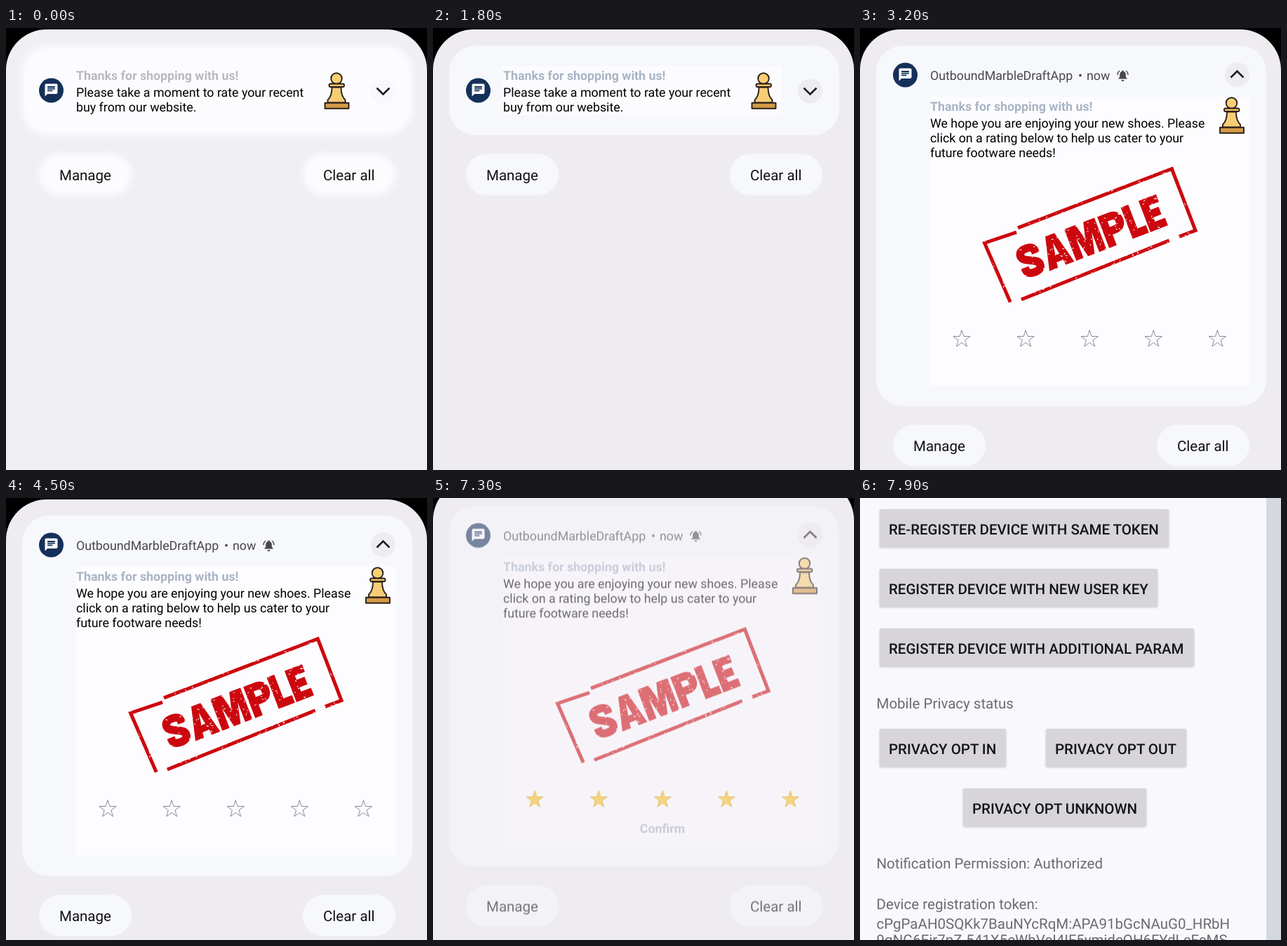
An HTML page for the animation above (8 s loop, 600 by 630 pixels).

```html
<!DOCTYPE html>
<html lang="en">
<head>
<meta charset="utf-8">
<style>
  html, body { margin: 0; width: 100%; height: 100%; overflow: hidden; }
  svg { display: block; width: 600px; height: 630px; }
  text { font: 17.8px Roboto, sans-serif; white-space: pre; text-rendering: geometricPrecision; }
  .title { font-weight: 700; fill: #a9b4c4; }
  .big { font-size: 20.5px; fill: #111113; }
  .label { font-size: 20.5px; fill: #6c6c70; }
  .button { font-size: 20.5px; font-weight: 500; fill: #151517; }
  .pad { fill: #d7d5d8; filter: drop-shadow(0 1.5px 1.5px #0003); }
  .line { fill: none; stroke: #1c1c1e; stroke-width: 2.6; }
</style>
</head>
<body>
<svg viewBox="0 0 600 630">
  <defs>
    <clipPath id="clip"><rect id="clipCard" x="23" y="25" width="556" rx="38"/></clipPath>
    <g id="pawn" stroke="#2b1f1d" stroke-width="1.900" stroke-linejoin="round">
      <path d="M464.500 84.500h13c0 9 1.500 14 6 18v4h-25v-4c4.500-4 6-9 6-18z" fill="#f6cd75"/>
      <circle cx="471" cy="72" r="7.800" fill="#f8cf72"/>
      <rect x="460.500" y="79.500" width="21.500" height="4.500" rx="2" fill="#f0c066"/>
      <rect x="454.500" y="106.800" width="34" height="8" fill="#d39a45"/>
    </g>
  </defs>

  <rect width="600" height="630" fill="#f9f8fb"/>
  <g id="app"></g>
  <rect id="strip" width="600" height="630" fill="#d4d9df"/>

  <g id="shade">
    <rect width="600" height="630" fill="#000"/>
    <rect id="panel" width="600" height="800" rx="58" fill="#efecf1"/>
    <g id="content">
      <g id="surfaces">
        <rect id="card" x="23" y="25" width="556" rx="38"/>
        <g class="actions">
          <rect x="47" y="26.500" width="132" height="59" rx="29.500"/>
          <rect x="423" y="26.500" width="132" height="59" rx="29.500"/>
        </g>
      </g>
      <g class="actions">
        <text class="big" x="76" y="63.500">Manage</text>
        <text class="big" x="452" y="63.500">Clear all</text>
      </g>

      <g id="compact">
        <rect x="99" y="54" width="398" height="70" fill="#fcfbfe"/>
        <text id="firstTitle" class="title" x="100" y="74">Thanks for shopping with us!</text>
        <text x="100" y="97.500">Please take a moment to rate your recent</text>
        <text x="100" y="119">buy from our website.</text>
        <use href="#pawn"/>
      </g>

      <g clip-path="url(#clip)">
        <g id="expanded">
          <rect x="100" y="98" width="455" height="412" fill="#fdfcff"/>
          <text class="title" x="100" y="118">Thanks for shopping with us!</text>
          <text x="100" y="142">We hope you are enjoying your new shoes. Please</text>
          <text x="100" y="163">click on a rating below to help us cater to your</text>
          <text x="100" y="184">future footware needs!</text>
          <use href="#pawn" x="58.500" y="35"/>
          <g transform="translate(327 294) rotate(-21)">
            <g fill="none" stroke="#cc080e" stroke-width="5">
              <path d="M-96-40L-144-42L-140 50M-92-45L143-45V49H118M103 49L-124 52"/>
              <g transform="translate(-109 -19.500)" stroke-width="11.500">
                <path d="M28 17V14Q28 6 17 6T6 14C6 24 28 24 28 34Q28 42 17 42T6 34V31"/>
                <path transform="translate(128)" d="M6 48V6H17Q28 6 28 16T17 26H6"/>
                <path transform="translate(164)" d="M6 0V42H25"/>
                <path transform="translate(191)" d="M27 6H6V42H27M6 24H24"/>
                <g fill="#cc080e" fill-rule="evenodd" stroke="none">
                  <path transform="translate(37)" d="M0 48L12 0H26L38 48H25L24 40H14L13 48ZM16 30H22L19 12Z"/>
                  <path transform="translate(78)" d="M0 48V0H17L23 24L29 0H46V48H35V18L28 48H18L11 18V48Z"/>
                </g>
              </g>
            </g>
            <path id="flecks" fill="none" stroke="#fdfcff"/>
          </g>
          <path id="stars"/>
          <text id="confirm" class="title" x="327" y="490.500" text-anchor="middle">Confirm</text>
        </g>
      </g>

      <g id="header" fill="#47474b">
        <text x="100" y="74">OutboundMarbleDraftApp</text>
        <text x="311" y="74">•</text>
        <text x="323" y="74">now</text>
        <path d="M368 72.500h13l-2.200-3V66a4.300 4.300 0 0 0-8.600 0v3.500zM372.500 74h4a2 2 0 0 1-4 0zM373.300 62v-1.500h2.400V62z"/>
        <path d="M367 67q0-4 3-6M382 67q0-4-3-6" fill="none" stroke="#47474b" stroke-width="1.400"/>
      </g>
      <g id="badge">
        <circle cx="64.500" r="17.500" fill="#14305a"/>
        <path transform="translate(53.700 -11.300) scale(.9)" fill="#fff" d="M20 2H4Q2 2 2 4V22L6 18H20Q22 18 22 16V4Q22 2 20 2ZM6 9H18V11H6ZM14 14H6V12H14ZM18 8H6V6H18Z"/>
      </g>
      <g id="toggle">
        <circle id="disc" cx="537.500" r="17.500" fill="#edecf1"/>
        <path id="chevron" class="line"/>
      </g>
    </g>
  </g>
</svg>
<script>
const $ = id => document.getElementById(id);
const set = (el, values) => { for (const k in values) el.setAttribute(k, values[k]); };
const clamp = v => Math.max(0, Math.min(1, v));
const mix = (a, b, k) => a + (b - a) * k;
const LOOP = 8000, STEP = 100;

// Screen behind the notification shade
const buttons = [
  [28, 16, 412, 'RE-REGISTER DEVICE WITH SAME TOKEN'],
  [28, 101, 396, 'REGISTER DEVICE WITH NEW USER KEY'],
  [28, 186, 448, 'REGISTER DEVICE WITH ADDITIONAL PARAM'],
  [28, 329, 180, 'PRIVACY OPT IN'],
  [265, 329, 200, 'PRIVACY OPT OUT'],
  [147, 414, 261, 'PRIVACY OPT UNKNOWN']
];
const labels = [
  [300, 'Mobile Privacy status'],
  [527.5, 'Notification Permission: Authorized'],
  [585.5, 'Device registration token:'],
  [614, 'cPgPaAH0SQKk7BauNYcRqM:APA91bGcNAuG0_HRbH'],
  [637, '9qNG6Ejr7pZ-541X5eWbVeI4IF5ymjdeQH6FYdLeFeMS']
];
$('app').innerHTML =
  buttons.map(([x, y, w, s]) =>
    `<rect class="pad" x="${x}" y="${y}" width="${w}" height="54" rx="2"/>
     <text class="button" x="${x + 13}" y="${y + 35.5}">${s}</text>`).join('') +
  labels.map(([y, s]) => `<text class="label" x="23.500" y="${y}">${s}</text>`).join('');

// Five rating stars
const star = cx => 'M' + Array.from({ length: 10 }, (_, i) => {
  const r = i % 2 ? 5 : 12.8, a = i * Math.PI / 5;
  return [cx + r * Math.sin(a), 443.5 - r * Math.cos(a)].map(v => v.toFixed(1));
}).join('L') + 'Z';
set($('stars'), { d: [0, 1, 2, 3, 4].map(i => star(145 + i * 91.1)).join('') });

// Worn ink on the stamp
let seed = 7;
const random = () => (seed = seed * 16807 % 2147483647) / 2147483647;
let flecks = '';
for (let i = 0; i < 300; i++) {
  const edge = i % 3 === 0;
  const x = mix(-146, 146, random());
  const y = edge ? (random() < .5 ? -46 : 50) + mix(-4, 4, random()) : mix(-22, 30, random());
  flecks += `M${x.toFixed(1)} ${y.toFixed(1)}l${mix(-3, 3, random()).toFixed(1)} ${mix(-2, 2, random()).toFixed(1)}`;
}
set($('flecks'), { d: flecks });

function draw(t) {
  // Surfaces sharpen at the start
  const sharp = clamp(t / 900);
  const tone = (a, b) => `rgb(${a.map((v, i) => mix(v, b[i], sharp))})`;
  $('surfaces').style.filter = sharp < 1 ? `blur(${5 * (1 - sharp)}px)` : 'none';
  set($('surfaces'), { fill: tone([252, 252, 254], [246, 248, 252]) });
  set($('panel'), { fill: tone([240, 239, 243], [239, 236, 241]) });
  $('firstTitle').style.fill = tone([186, 186, 190], [169, 180, 196]);
  set($('disc'), { opacity: mix(.3, 1, sharp) });

  // Card expands
  const p = clamp((t - 2600) / 394);
  const open = 1 - (1 - p ** 1.5) ** 4;
  const fade = clamp((open - .46) / .54);
  const height = mix(128, 514, open);
  set($('card'), { height });
  set($('clipCard'), { height });
  document.querySelectorAll('.actions').forEach(g =>
    set(g, { transform: `translate(0 ${25 + height})` }));
  set($('compact'), { opacity: 1 - fade });
  set($('expanded'), { opacity: fade });
  set($('header'), { opacity: open });
  const lift = open ** 1.6;
  set($('badge'), { transform: `translate(0 ${mix(89, 67, lift)})` });
  set($('toggle'), { transform: `translate(0 ${mix(90, 66.5, lift)})` });
  set($('chevron'), {
    d: fade > .5 ? 'M528.5 4L537.5-5L546.5 4' : 'M528.5-4.500L537.5 4.500L546.5-4.500',
    opacity: Math.max(fade, 1 - fade)
  });

  // Rating is chosen
  const rated = t >= 5700;
  set($('stars'), {
    fill: rated ? '#fbc01d' : 'none',
    stroke: rated ? '#d9a319' : '#8b8b90',
    'stroke-width': 1
  });
  set($('confirm'), { opacity: +rated });

  // Shade closes, then the next screen pushes in
  const shown = 1 - clamp((t - 7200) / 220);
  const cover = 1 - clamp((t - 7400) / 500) ** 1.2;
  const push = clamp((t - 7800) / 100);
  set($('content'), { opacity: shown, transform: `translate(0 ${-30 * (1 - shown)})` });
  set($('panel'), { y: mix(-60, 2, shown) });
  set($('shade'), { opacity: cover });
  $('app').style.filter = cover > 0 ? `blur(${4.5 * cover}px)` : 'none';
  set($('app'), { transform: `translate(${24 * (1 - push)} 0)` });
  set($('strip'), { x: 600 - 21 * push });
}

const start = performance.now();
function tick() {
  const t = (performance.now() - start) % LOOP;
  draw(Math.floor(t / STEP) * STEP);
  requestAnimationFrame(tick);
}
tick();
</script>
</body>
</html>
```
